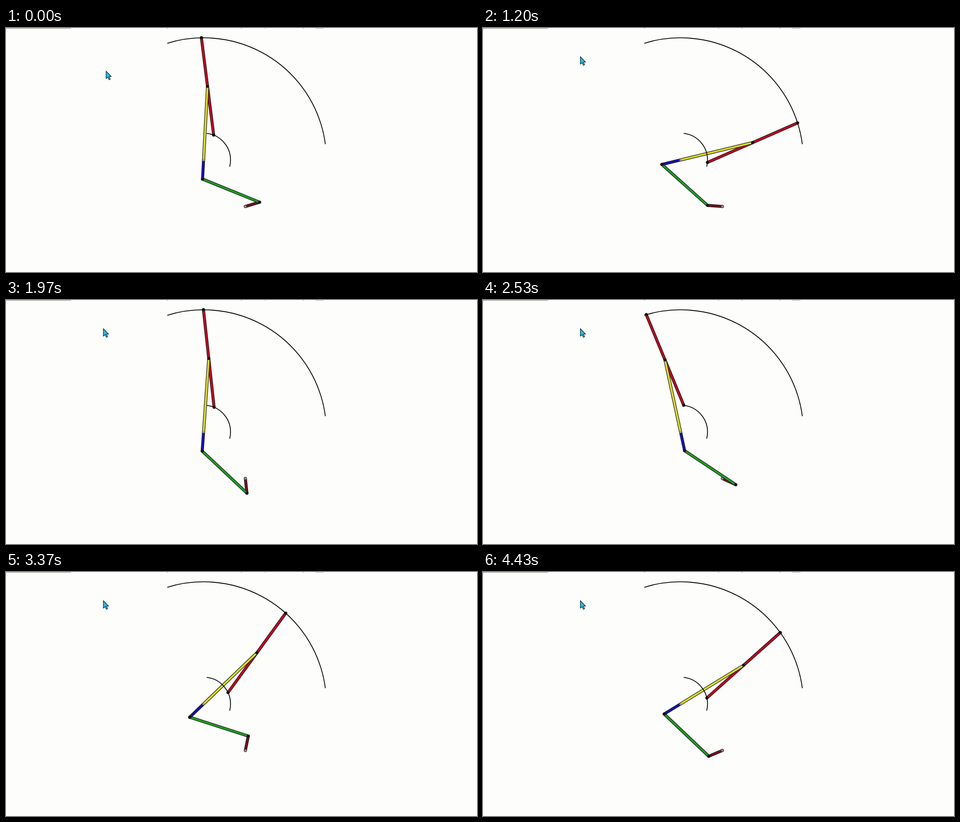
Animation, 1037 px wide and 540 px high, one loop 4460 ms. Source, as an HTML page with a canvas:

```html
<!DOCTYPE html>
<html lang="en">
<head>
<meta charset="utf-8">
<title>Four-bar linkage</title>
<style>
  html, body { margin: 0; width: 100%; height: 100%; overflow: hidden; background: #fdfdfc; }
  canvas { display: block; }
</style>
</head>
<body>
<canvas id="stage" width="1037" height="540"></canvas>
<script>
const ctx = document.getElementById('stage').getContext('2d');
const LOOP = 4460, STEPS = 134;
const RAD = Math.PI / 180;

const rockerPivot = { x: 435, y: 292 };
const crankPivot = { x: 527, y: 395 };
const CRANK = 32.6, COUPLER = 135.5, SHORT_ARM = 42.4, LONG_ARM = 163;
const HALF_BLADE = 108.5, BLADE_TILT = -10.2 * RAD;

// Crank angle in degrees over time in ms; the motor runs unevenly.
const crankKeys = [
  [0, -16.9], [530, -84.5], [770, -121.3], [1530, -217.6], [1970, -276.9], [2130, -296],
  [2530, -335], [2670, -348.5], [3200, -414.5], [3370, -439.7], [3730, -480], [4430, -563.4]
];

function slopeAt(keys, i) {
  const a = keys[Math.max(i - 1, 0)], b = keys[Math.min(i + 1, keys.length - 1)];
  return (b[1] - a[1]) / (b[0] - a[0]);
}

function interpolate(keys, t) {
  let i = 0;
  while (i < keys.length - 2 && t > keys[i + 1][0]) i++;
  const [t0, v0] = keys[i], [t1, v1] = keys[i + 1];
  const span = t1 - t0, u = Math.min((t - t0) / span, 1), w = 1 - u;
  return v0 * (1 + 2 * u) * w * w + v1 * u * u * (3 - 2 * u)
    + span * u * w * (slopeAt(keys, i) * w - slopeAt(keys, i + 1) * u);
}

const polar = (p, r, a) => ({ x: p.x + r * Math.cos(a), y: p.y + r * Math.sin(a) });

function solve(crankAngle) {
  const crankPin = polar(crankPivot, CRANK, crankAngle);
  const dx = crankPin.x - rockerPivot.x, dy = crankPin.y - rockerPivot.y;
  const d = Math.hypot(dx, dy);
  const inner = Math.acos((SHORT_ARM ** 2 + d * d - COUPLER ** 2) / (2 * SHORT_ARM * d));
  const armAngle = Math.atan2(dy, dx) + inner;
  const longAngle = armAngle + Math.PI;
  const joint = polar(rockerPivot, LONG_ARM, longAngle);
  return {
    crankPin, joint,
    armPin: polar(rockerPivot, SHORT_ARM, armAngle),
    tip: polar(joint, HALF_BLADE, longAngle + BLADE_TILT),
    tail: polar(joint, -HALF_BLADE, longAngle + BLADE_TILT)
  };
}

function line(a, b, width, color) {
  ctx.lineWidth = width;
  ctx.strokeStyle = color;
  ctx.beginPath();
  ctx.moveTo(a.x, a.y);
  ctx.lineTo(b.x, b.y);
  ctx.stroke();
}

function bar(a, b, color) {
  ctx.lineCap = 'round';
  line(a, b, 6.6, '#1c1a18');
  ctx.lineCap = 'butt';
  line(a, b, 4.2, color);
}

function dot(p, r, color) {
  ctx.fillStyle = color;
  ctx.beginPath();
  ctx.arc(p.x, p.y, r, 0, 7);
  ctx.fill();
}

function trace(radius, from, to) {
  ctx.lineWidth = 1.8;
  ctx.strokeStyle = '#080808';
  ctx.beginPath();
  ctx.arc(rockerPivot.x, rockerPivot.y, radius, from * RAD, to * RAD);
  ctx.stroke();
}

const arrow = new Path2D('M0 0V16.5L3.8 13.2L6.6 19.2L9.4 17.8L6.8 12H11.4Z');

function cursor(t) {
  const u = Math.min(Math.max((t - 60) / 300, 0), 1), e = u * u * (3 - 2 * u);
  ctx.save();
  ctx.translate(220.4 - 6 * e, 95.5 - 32 * e);
  ctx.fillStyle = '#22bdea';
  ctx.fill(arrow);
  ctx.lineWidth = 1.2;
  ctx.strokeStyle = '#10242c';
  ctx.stroke(arrow);
  ctx.restore();
}

function topEdge() {
  ctx.fillStyle = '#77776f';
  ctx.fillRect(0, 0, 143, 1);
  ctx.fillStyle = '#a8a8a4';
  ctx.fillRect(681, 0, 18, 1);
  for (const x of [354, 517, 569, 653]) ctx.fillRect(x, 0, 3, 1);
}

function draw(t) {
  ctx.fillStyle = '#fdfdfc';
  ctx.fillRect(0, 0, 1037, 540);
  topEdge();

  const m = solve(interpolate(crankKeys, t) * RAD);
  bar(crankPivot, m.crankPin, '#74101e');
  dot(crankPivot, 3.4, '#3c3836');
  dot(crankPivot, 2.3, '#9a9490');
  bar(m.tail, m.tip, '#bd0a20');
  bar(m.armPin, m.crankPin, '#1c9d24');
  bar(rockerPivot, m.armPin, '#1410bc');
  bar(rockerPivot, m.joint, '#d9da2c');
  dot(rockerPivot, 2.6, '#a09c78');
  for (const p of [m.armPin, m.crankPin, m.joint, m.tip, m.tail]) dot(p, 3.3, '#141212');

  trace(270.3, -107.2, -7.4);
  trace(59.3, -83.5, 14.6);
  cursor(t);
}

function tick(now) {
  const step = Math.floor((now % LOOP) / LOOP * STEPS);
  draw(step * LOOP / STEPS);
  requestAnimationFrame(tick);
}

draw(0);
requestAnimationFrame(tick);
</script>
</body>
</html>
```
